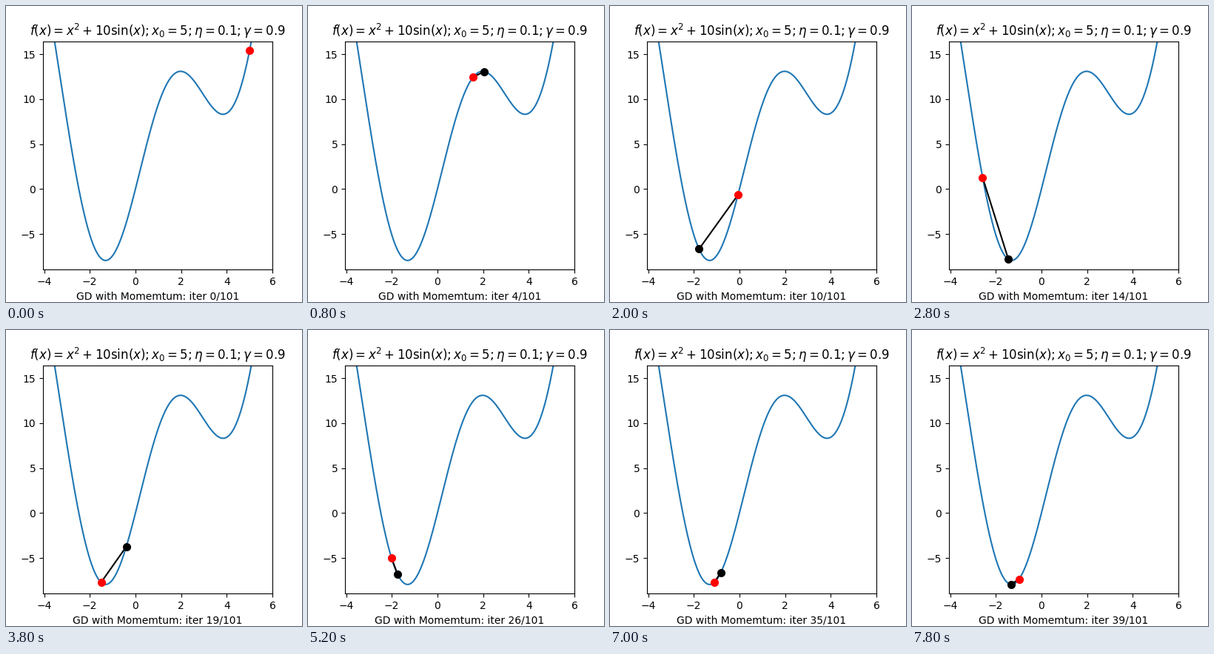
Animation, 400 px wide and 400 px high, one loop 8000 ms. Source, as a matplotlib script:

```python
import numpy as np
import matplotlib.pyplot as plt
from matplotlib.animation import FuncAnimation

ETA, GAMMA, START = 0.1, 0.9, 5.0
ITERS = 101
FRAMES, INTERVAL = 40, 200


def cost(x):
    return x**2 + 10 * np.sin(x)


def grad(x):
    return 2 * x + 10 * np.cos(x)


def descend():
    """Gradient descent with momentum; returns every visited x."""
    xs, v = [START], 0.0
    for _ in range(ITERS):
        v = GAMMA * v + ETA * grad(xs[-1])
        xs.append(xs[-1] - v)
    return np.array(xs)


xs = descend()
ys = cost(xs)

fig, ax = plt.subplots(figsize=(4, 4), dpi=100)
ax.set_xlim(xs.min() - 1, xs.max() + 1)
ax.set_ylim(ys.min() - 1, ys.max() + 1)
ax.set_title(r"$f(x) = x^2 + 10\sin(x); x_0 = 5; \eta = 0.1; \gamma = 0.9$")

grid = np.linspace(-5.5, 6.5, 1000)
ax.plot(grid, cost(grid))
step, = ax.plot([], [], "k-")
prev, = ax.plot([], [], "ko", markersize=7)
now, = ax.plot([], [], "ro", markersize=7)
label = ax.set_xlabel("")


def update(i):
    lo = max(i - 1, 0)
    step.set_data(xs[lo:i + 1], ys[lo:i + 1])
    prev.set_data(xs[lo:i], ys[lo:i])
    now.set_data(xs[i:i + 1], ys[i:i + 1])
    label.set_text(f"GD with Momemtum: iter {i}/{ITERS}")
    return step, prev, now, label


anim = FuncAnimation(fig, update, frames=FRAMES, interval=INTERVAL,
                     repeat=True, repeat_delay=0)
plt.show()
```
